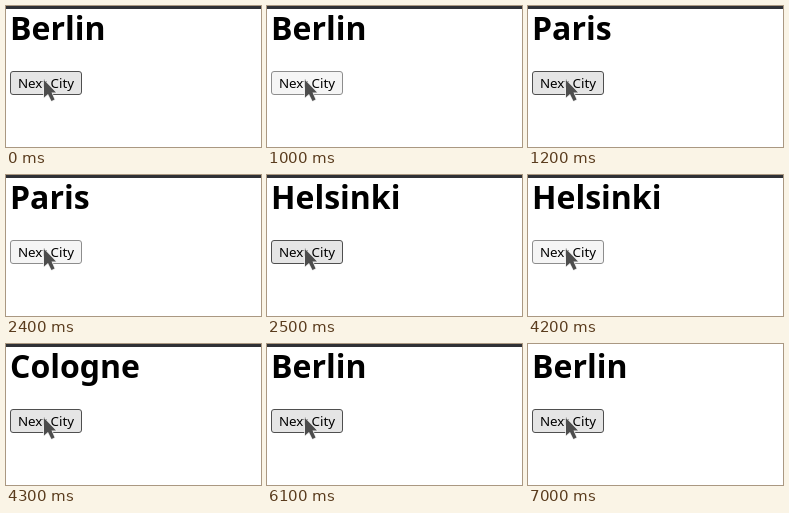
An HTML page that plays this animation: 255 px wide and 141 px high, repeating every 7200 ms.

```html
<!DOCTYPE html>
<html lang="en">
<head>
<meta charset="utf-8">
<title>Next City</title>
<style>
  html, body {
    margin: 0;
    width: 100%;
    height: 100%;
    overflow: hidden;
    background: #fff;
    color: #000;
    font-family: "Noto Sans", "Open Sans", sans-serif;
  }
  .bar, h1, .button, .cursor { position: absolute; }
  .bar, h1 span, .button { animation: 7.2s step-end infinite; }

  .bar {
    inset: 0 0 auto;
    height: 3px;
    background: #2f3136;
    animation-name: bar;
  }
  h1 {
    left: 4px;
    top: 0;
    margin: 0;
    font-size: 32px;
    font-weight: 700;
    line-height: 44px;
    white-space: nowrap;
  }
  h1 span { position: absolute; left: 0; top: 0; visibility: hidden; }
  .berlin { animation-name: berlin; }
  .paris { animation-name: paris; }
  .helsinki { animation-name: helsinki; }
  .cologne { animation-name: cologne; }

  .button {
    left: 4px;
    top: 65px;
    width: 72px;
    height: 24px;
    box-sizing: border-box;
    border: 1px solid #4f4f4f;
    border-radius: 3px;
    background: #e5e5e5;
    font-size: 13.333px;
    line-height: 22px;
    text-align: center;
    white-space: nowrap;
    animation-name: press;
  }
  .cursor { left: 34px; top: 70px; }

  @keyframes bar { 97.2222% { visibility: hidden; } }
  @keyframes berlin {
    0%, 84.7222% { visibility: visible; }
    16.6667% { visibility: hidden; }
  }
  @keyframes paris {
    16.6667% { visibility: visible; }
    34.7222% { visibility: hidden; }
  }
  @keyframes helsinki {
    34.7222% { visibility: visible; }
    59.7222% { visibility: hidden; }
  }
  @keyframes cologne {
    59.7222% { visibility: visible; }
    84.7222% { visibility: hidden; }
  }
  @keyframes press {
    0%, 16.6667%, 34.7222%, 59.7222% { background: #e5e5e5; border-color: #4f4f4f; }
    13.8889%, 33.3333%, 58.3333% { background: #f5f5f5; border-color: #8d8d8d; }
  }
</style>
</head>
<body>
  <div class="bar"></div>
  <h1>
    <span class="berlin">Berlin</span>
    <span class="paris">Paris</span>
    <span class="helsinki">Helsinki</span>
    <span class="cologne">Cologne</span>
  </h1>
  <div class="button">Next City</div>
  <svg class="cursor" width="20" height="28">
    <path d="M4 4V21.5L8 18L11.5 25L14.5 23.5L11.5 16.5H16Z"
      fill="#4d4d4d" stroke="#eee" stroke-width="1.6" stroke-linejoin="round" paint-order="stroke"/>
  </svg>
</body>
</html>
```
